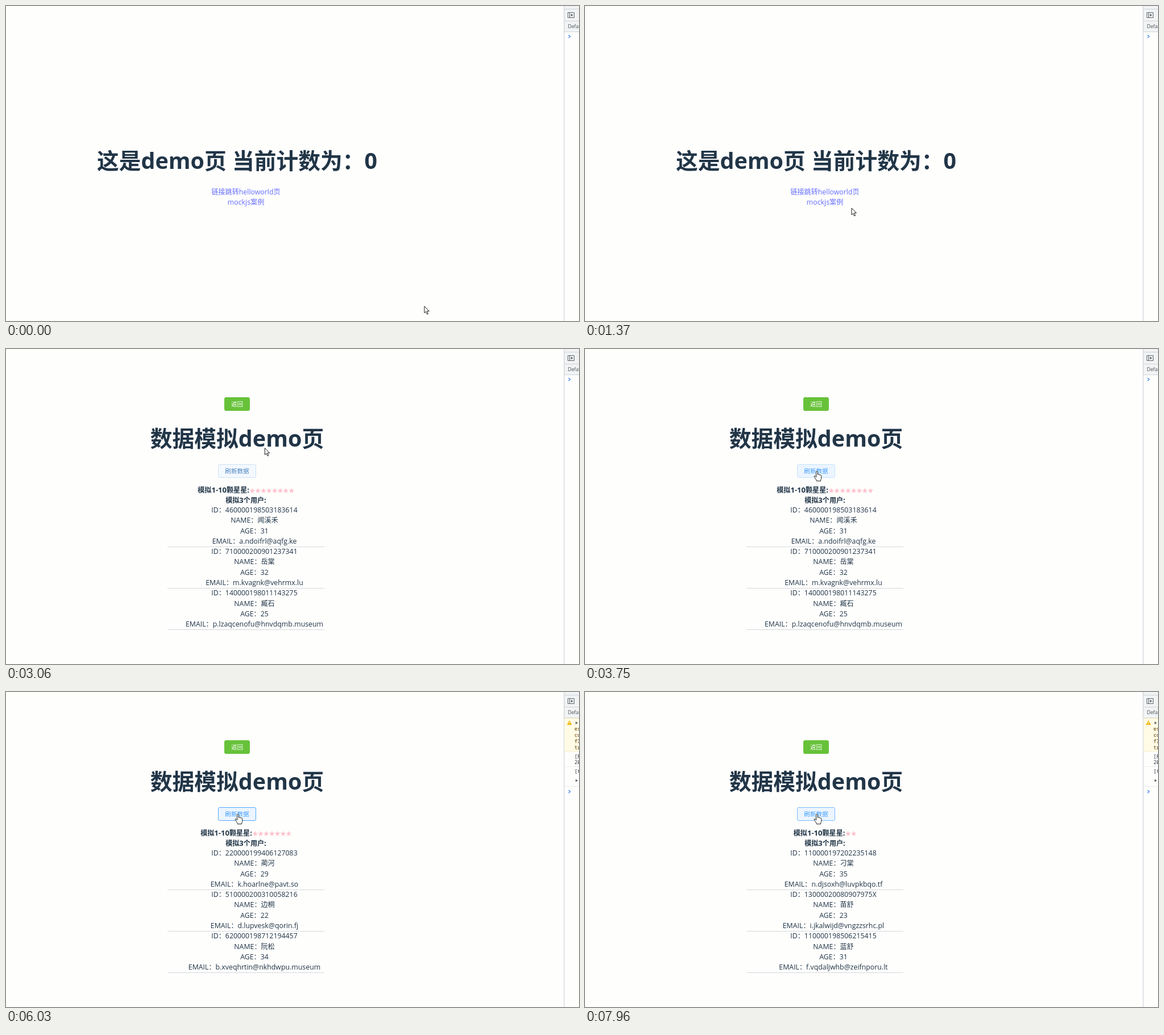
Animation, 1008 px wide and 555 px high, one loop 8 s. Source, as an HTML page:

```html
<!DOCTYPE html>
<html lang="zh-CN">
<head>
<meta charset="utf-8">
<title>mockjs demo</title>
<style>
  html, body { margin: 0; width: 100%; height: 100%; overflow: hidden; }
  body {
    position: relative; background: #fefefd; color: #213547;
    font: 12.1px/18px "Open Sans", "Noto Sans CJK SC", "Noto Sans CJK", sans-serif;
  }
  #page, #panel { position: absolute; left: 0; top: 0; width: 1008px; height: 555px; }
  .line { position: absolute; width: 700px; margin: -9px 0 0 -350px; text-align: center; white-space: pre; }
  .line i { font-style: normal; font-size: 1.02em; }
  .title { font-size: 38.75px; font-weight: 700; line-height: 56px; margin-top: -28px; }
  .link { color: #646cff; }
  .bold { font-weight: 700; }
  .bold i { font-size: 1.08em; }
  .stars {
    font: 400 10.6px/1 "Noto Sans CJK SC", "Noto Sans CJK", "DejaVu Sans", sans-serif;
    letter-spacing: -.75px; color: #ffc0cb; position: relative; top: -.4px;
  }
  .rule { position: absolute; left: 284px; width: 275.5px; height: 1px; background: #d6d8da; }
  .btn {
    position: absolute; box-sizing: border-box; height: 24px; border: 1px solid; border-radius: 3px;
    font-size: 10.6px; line-height: 22px; text-align: center;
  }
  #back { left: 384px; top: 85px; width: 45px; color: #fff; background: #67c23a; border-color: #67c23a; }
  #refresh { left: 373px; top: 203px; width: 67px; }
  #panel text { font: 8.7px "Noto Sans Mono", "DejaVu Sans Mono", monospace; fill: #303942; }
  #panel .warn { fill: #5c3c00; }
  #panel #levels { font: 8.6px "Open Sans", sans-serif; fill: #4a4f55; }
</style>
</head>
<body>
<div id="page"></div>
<svg id="panel" viewBox="0 0 1008 555">
  <rect x="982" width="26" height="555" fill="#fefefd"/>
  <rect x="982" width="26" height="45.5" fill="#f1f3f4"/>
  <path d="M982 5.5h26M982 26.5h26M982 45.5h26" stroke="#cacdd1" stroke-width=".8"/>
  <path d="M981.9 0v555" stroke="#c6cad0"/>
  <path d="M988.5 11.5h11v9h-11zM991.5 11.5v9" fill="none" stroke="#5f6368"/>
  <path d="M993.8 13.4v5.2l3.8-2.6z" fill="#5f6368"/>
  <text id="levels" x="988.5" y="39">Default levels</text>
  <g id="logs">
    <rect x="982.5" y="46" width="26" height="58" fill="#fffbe5"/>
    <path d="M982.5 46.2h26M982.5 104.3h26" stroke="#f6e7b5" stroke-width=".8"/>
    <path d="M991.2 50l4.4 8h-8.8z" fill="#f0b400"/>
    <path d="M991.2 52.6v2.8M991.2 56v1" stroke="#fff"/>
    <path d="M1002 52v5l4-2.5zM1002 153.5v5l4-2.5z" fill="#5f6368"/>
    <path d="M982.5 131.5h26M982.5 166.5h26" stroke="#ebebeb"/>
    <g id="rows"></g>
  </g>
  <path id="prompt" d="M989.6 51l3 2.6-3 2.6" fill="none" stroke="#367cf1" stroke-width="1.2"/>
  <g id="cursor" fill="#fff" stroke="#111" stroke-width=".95" stroke-linejoin="round">
    <path id="arrow" d="M0 0V11.8L2.7 9.4 4.7 14 6.6 13.2 4.6 8.7H8.4Z"/>
    <path id="hand" d="M-1.3 1.4C-1.3-.2 1.3-.2 1.3 1.4V6.2C2 5.3 3.5 5.6 3.6 6.7 4.4 5.9 5.7 6.3 5.8 7.3 6.7 6.7 7.8 7.3 7.8 8.5V12C7.8 14 6.6 14.8 6.6 17.6H-.7C-.7 15.6-2 14.4-3 12.7L-4.7 10C-5.3 8.7-3.8 7.8-2.8 8.9L-1.3 10.6Z"/>
    <path id="beam" fill="none" d="M-2.5-5.7H-.8L0-5 .8-5.7H2.5M0-5V5M-2.5 5.7H-.8L0 5 .8 5.7H2.5"/>
  </g>
</svg>
<script>
const LOOP = 8000, ROUTE = 1890, LOADED = 2060;
const $ = id => document.getElementById(id);
const clamp = v => Math.max(0, Math.min(1, v));

// stars, then id / name / age / email of each user
const sets = [
  [8, ['460000198503183614', '闻溪禾', 31, 'a.ndoifrl@aqfg.ke'],
      ['710000200901237341', '岳棠', 32, 'm.kvagnk@vehrmx.lu'],
      ['140000198011143275', '臧石', 25, 'p.lzaqcenofu@hnvdqmb.museum']],
  [6, ['710000198905185630', '卜岩', 24, 'h.qdlokvu@rvgd.bn'],
      ['140000201508278794', '弓木', 27, 'm.gjus@nchquwxv.de'],
      ['340000201204292869', '羿岩', 20, 't.keqhtfaik@nzwdlup.pe']],
  [7, ['220000199406127083', '蔺河', 29, 'k.hoarlne@pavt.so'],
      ['510000200310058216', '边桐', 22, 'd.lupvesk@qorin.fj'],
      ['620000198712194457', '阮松', 34, 'b.xveqhrtin@nkhdwpu.museum']],
  [9, ['330000201601190725', '骆萤', 32, 'w.bvlsshzom@jddinyxl.int'],
      ['330000200105207765', '桑荷', 32, 'v.lkrxyx@fdwlws.nu'],
      ['450000201807312369', '郗宁', 32, 'b.wrcrlrja@gsen.cc']],
  [2, ['110000197202235148', '刁棠', 35, 'n.djsoxh@luvpkbqo.tf'],
      ['13000020080907975X', '苗舒', 23, 'i.jkalwijd@vngzzsrhc.pl'],
      ['110000198506215415', '蓝舒', 31, 'f.vqdaljwhb@zeifnporu.lt']]
];

// each refresh: button pressed, console cleared, data shown
const rounds = [[4000, 4170, 4340], [5000, 5170, 5370], [6000, 6140, 6310], [7000, 7100, 7270], [7960, 9000, 9000]];
const hovers = [[2960, 3020], [3340, 3440], [3590, 9000]];

// time, x, y, pointer shape from here on
const path = [
  [0, 736, 529, 'arrow'], [30, 736, 529], [250, 590, 400], [360, 500, 300, 'beam'],
  [480, 402, 262], [600, 430, 275], [820, 505, 303, 'arrow'], [860, 505, 303],
  [1080, 671, 532], [1370, 469, 356], [1405, 469, 356], [1480, 455, 353, 'hand'],
  [1580, 428, 349], [1680, 429, 349], [2370, 429, 349], [2400, 427, 351, 'beam'],
  [2480, 422, 352], [2680, 422, 352], [2830, 428, 290], [2960, 434, 225, 'hand'],
  [3020, 445, 195, 'arrow'], [3080, 460, 165, 'beam'], [3180, 464, 140],
  [3280, 452, 175], [3340, 436, 204, 'hand'], [3440, 424, 227, 'arrow'],
  [3480, 418, 231], [3550, 418, 231], [3590, 415, 227, 'hand'], [3750, 408, 215], [LOOP, 408, 215]
];

const latin = s => s.replace(/[\x20-\x7e]+/g, '<i>$&</i>');
const line = (text, x, y, cls = '', extra = '') =>
  `<div class="line ${cls}" style="left:${x}px;top:${y}px">${latin(text)}${extra}</div>`;

const home = () =>
  line('这是demo页 当前计数为：0', 406.5, 271.5, 'title') +
  line('链接跳转helloworld页', 422, 328, 'link') +
  line('mockjs案例', 422, 346.2, 'link');

const user = ([id, name, age, email], n) => {
  const y = 284.2 + n * 73.1;
  return [`ID：${id}`, `NAME：${name}`, `AGE：${age}`, `EMAIL：${email}`]
    .map((s, k) => line(s, 437, y + k * 18.16)).join('') +
    `<div class="rule" style="top:${348 + n * 73}px"></div>`;
};

const demo = ([stars, ...users]) =>
  '<div class="btn" id="back">返回</div>' +
  line('数据模拟demo页', 406.5, 156.5, 'title') +
  '<div class="btn" id="refresh">刷新数据</div>' +
  line('模拟1-10颗星星:', 422, 248, 'bold', `<span class="stars">${'★'.repeat(stars)}</span>`) +
  line('模拟3个用户:', 422, 266.2, 'bold') +
  users.map(user).join('');

const rows = [['es', 68], ['co', 79], ['fl', 90], ['tr', 101], ['[R', 117], ['20', 127], ['[t', 143]];
$('rows').innerHTML = rows.map(([s, y], k) =>
  `<text x="1000" y="${y}" class="${k < 4 ? 'warn' : ''}">${s}</text>`).join('');

const mix = (a, b, k) => a.map((v, i) => v + (b[i] - v) * k);
const rgb = c => `rgb(${c.map(Math.round)})`;
const level = (spans, t, ramp) =>
  Math.max(...spans.map(([a, b]) => Math.min(clamp((t - a) / ramp), clamp(1 - (t - b) / ramp))));

function styleButton(t) {
  const hover = level(hovers, t, 100);
  const press = level(rounds.map(([a, , b]) => [a - 40, b - 40]), t, 60);
  const s = $('refresh').style;
  s.color = rgb(mix([96, 98, 102], [64, 158, 255], hover));
  s.background = rgb(mix([255, 255, 255], [236, 245, 255], hover));
  s.borderColor = rgb(mix(mix([220, 223, 230], [198, 226, 255], hover), [80, 167, 255], press));
}

function moveCursor(t) {
  let i = 0, shape = 'arrow';
  while (i < path.length - 2 && path[i + 1][0] <= t) shape = path[++i][3] || shape;
  const [t0, ...a] = path[i], [t1, ...b] = path[i + 1];
  const [x, y] = mix(a.slice(0, 2), b, clamp((t - t0) / (t1 - t0)));
  $('cursor').setAttribute('transform', `translate(${x.toFixed(1)} ${y.toFixed(1)})`);
  for (const id of ['arrow', 'hand', 'beam']) $(id).style.display = id === shape ? '' : 'none';
}

let shown;
function draw() {
  const t = performance.now() % LOOP;
  const count = rounds.filter(r => t >= r[2]).length;
  const view = t < ROUTE ? 'home' : t < LOADED ? 'empty' : count;
  if (view !== shown) {
    shown = view;
    $('page').innerHTML = view === 'home' ? home() : demo(view === 'empty' ? [0] : sets[count]);
    $('page').style.top = view === 'empty' ? '110px' : '0';
  }
  if (view !== 'home') styleButton(t);

  const cleared = rounds.some(([, a, b]) => t >= a && t < b);
  const logged = count > 0 && !cleared;
  $('logs').style.display = logged ? '' : 'none';
  $('prompt').setAttribute('transform', `translate(0 ${logged ? 122 : 0})`);
  $('levels').style.opacity = rounds.some(([, a]) => t >= a && t < a + 30) ? .4 : 1;
  moveCursor(t);
  requestAnimationFrame(draw);
}
draw();
</script>
</body>
</html>
```
